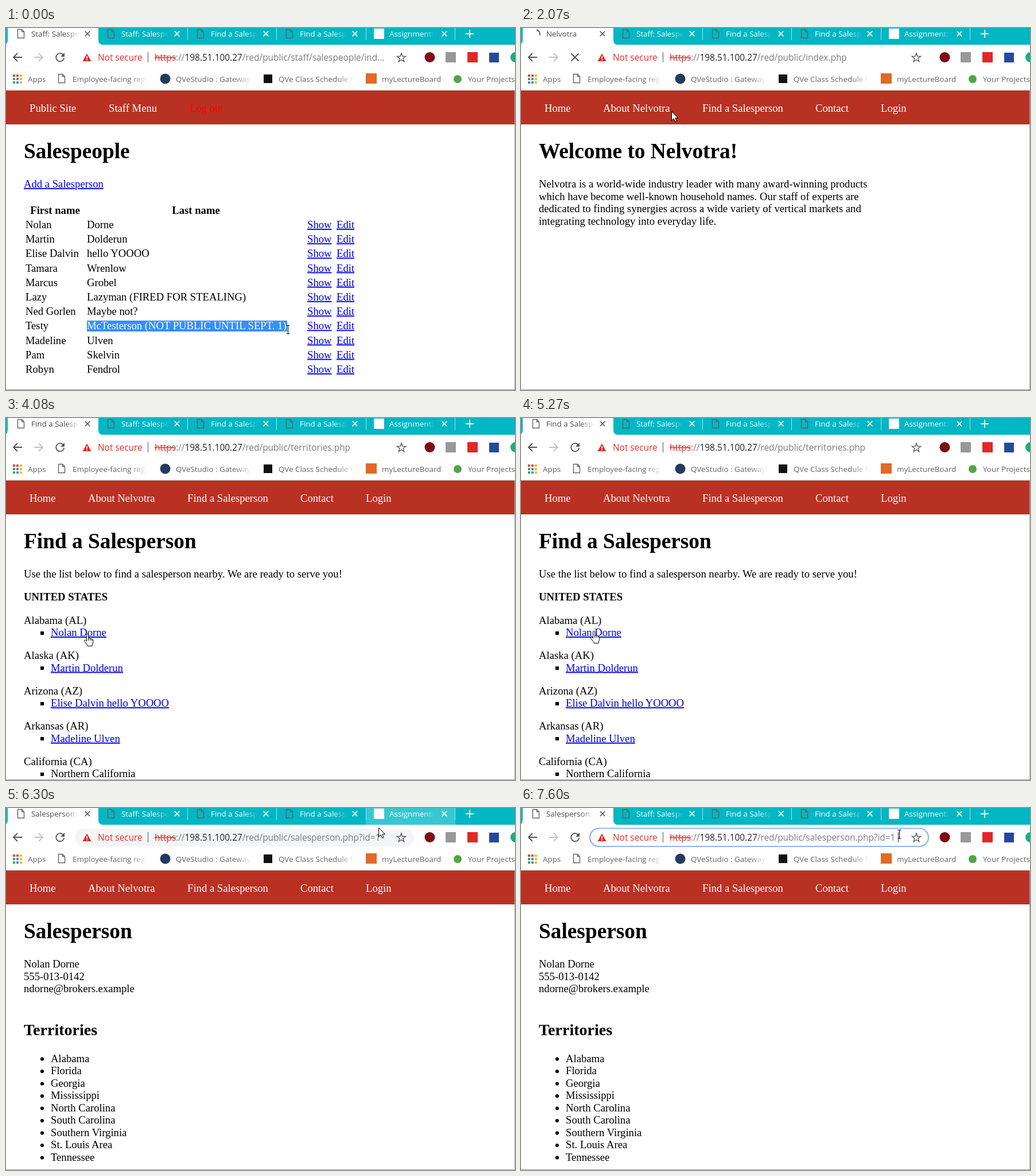
Write an HTML page that moves like this. It is 887 by 631 pixels and loops after 8 s.

```html
<!DOCTYPE html>
<html lang="en">
<head>
<meta charset="utf-8">
<title>Staff site walkthrough</title>
<style>
html, body { margin: 0; width: 100%; height: 100%; overflow: hidden; background: #fff; }
svg { display: block; width: 887px; height: 631px; }
text { white-space: pre; }
.page { font: 18.67px "Liberation Serif", "Times New Roman", serif; }
.ui { font: 13.4px "Open Sans", "Noto Sans", sans-serif; }
.url { font-size: 15.4px; fill: #777b80; }
.link { fill: #00e; text-decoration: underline; }
.b { font-weight: bold; }
.h1 { font-weight: bold; font-size: 37.33px; }
.h2 { font-weight: bold; font-size: 28px; }
.line { fill: none; stroke: #5f6368; }
</style>
</head>
<body>
<svg id="stage" viewBox="0 0 887 631" xmlns="http://www.w3.org/2000/svg"></svg>
<script>
const LOOP = 8000, TEAL = '#00b7c3', RED = '#d93025', GREY = '#5f6368', BLUE = '#3390ff';
const defs = [];

const text = (x, y, s, cls = '', attr = '') => `<text x="${x}" y="${y}" class="${cls}" ${attr}>${s}</text>`;
const rect = (x, y, w, h, fill, attr = '') => `<rect x="${x}" y="${y}" width="${w}" height="${h}" fill="${fill}" ${attr}/>`;
const dot = (x, y, r, fill) => `<circle cx="${x}" cy="${y}" r="${r}" fill="${fill}"/>`;
const line = (d, color, w = 1.5, attr = '') => `<path d="${d}" fill="none" stroke="${color}" stroke-width="${w}" ${attr}/>`;
const group = (id, body, cls = '') => `<g id="${id}" class="${cls}">${body}</g>`;
const cross = (x, y, r, color, w) => line(`M${x - r} ${y - r}l${2 * r} ${2 * r}m0 ${-2 * r}l${-2 * r} ${2 * r}`, color, w);
const sheet = (x, y) => line(`M${x + .5} ${y + .5}h7l4 4v11h-11zM${x + 7.5} ${y + .5}v4h4`, GREY, 1.4);

// Text that fades out towards its right end
function fading(x, y, s, color, end, len = 30) {
  const id = 'fade' + defs.length;
  defs.push(`<linearGradient id="${id}" gradientUnits="userSpaceOnUse" x1="${end - len}" x2="${end}" y1="0" y2="0">
    <stop offset="0" stop-color="${color}"/><stop offset="1" stop-color="${color}" stop-opacity="0"/></linearGradient>`);
  return text(x, y, s, '', `fill="url(#${id})"`);
}

// ---- browser frame ----
const titles = { staff: 'Staff: Salespe', home: 'Nelvotra', find: 'Find a Salesp', person: 'Salesperson:' };

function tabs() {
  let s = rect(0, 0, 887, 29.5, TEAL);
  s += group('tabHover', rect(627, 0, 156, 29, '#fff', 'opacity=".22"'));
  s += '<path d="M-5 30Q3 29 3 21V0H161V21Q161 29.5 170 29.5V30Z" fill="#fff"/>';
  s += group('tabIcon', sheet(20, 2));
  s += `<path id="spinner" class="line" stroke-width="2" d="M24.5 3.2A7 7 0 1 0 26 3" pathLength="100"/>`;
  for (const k in titles) s += group('title-' + k, fading(44, 15, titles[k], '#45494d', 128, 24));
  s += cross(142, 10, 4.3, '#50555a', 1.6);
  [[177, titles.staff, 298], [333, titles.find, 453], [488, titles.find, 608], [641, 'Assignment:', 764]].forEach(([x, t, close], i) => {
    s += i < 3 ? sheet(x, 2) : rect(x, 1, 18, 18, '#fff');
    s += fading(i < 3 ? x + 24 : 668, 15, t, '#fff', close - 14, 24) + cross(close, 10, 4.3, '#fff', 1.7);
  });
  for (const x of [316, 471, 627, 782]) s += rect(x, 0, 1, 21, '#a5e3e8');
  return s + line('M801 10h14M808 3v14', '#fff', 2);
}

const urls = {
  staff: '/red/public/staff/salespeople/ind...',
  home: '/red/public/index.php',
  find: '/red/public/territories.php',
  person: '/red/public/salesperson.php?id=1'
};
const HOST = '198.51.100.27';

function toolbar() {
  let s = rect(0, 29.5, 887, 79, '#fff');
  s += group('omniHover', rect(120, 36, 591, 31, '#f3f5f6', 'rx="15.5"'));
  s += group('omniFocus', rect(120, 35.5, 590, 31.5, '#fff', 'rx="15.7" stroke="#8fb4f5" stroke-width="2.2"'));
  s += line('M28 51H13M20 44l-7 7 7 7', '#50555a', 1.8);
  s += line('M49 51h15M57 44l7 7-7 7', '#bfc2c5', 1.8);
  s += group('reload', line('M100 47.2A7 7 0 1 0 101.2 52', '#50555a', 1.8) + '<path d="M102 43v7h-7z" fill="#50555a"/>');
  s += group('stop', cross(94, 51, 6.5, '#50555a', 1.8));
  s += `<path d="M141 44.5L148.5 58H133.5Z" fill="${RED}"/>` + rect(140.2, 49, 1.7, 4.5, '#fff') + rect(140.2, 54.7, 1.7, 1.7, '#fff');
  s += text(160, 57, 'Not secure', '', `font-size="15.4" fill="${RED}"`) + rect(247, 42, 1, 18, '#555');
  for (const k in urls) s += group('url-' + k, text(259, 57,
    `<tspan fill="${RED}" text-decoration="line-through">https</tspan>://<tspan fill="#202124">${HOST}</tspan>${urls[k]}`, 'url'));
  s += group('urlSelected', rect(259, 39, 387, 24, BLUE) +
    text(259, 57, `https://${HOST}${urls.person.slice(0, -1)}`, 'url', 'style="fill:#fff"'));
  s += group('caret', rect(657, 42, 1, 18, '#333'));
  let star = '';
  for (let i = 0; i < 10; i++) {
    const r = i % 2 ? 3.3 : 8, a = i * Math.PI / 5;
    star += `${i ? 'L' : 'M'}${(689 + r * Math.sin(a)).toFixed(1)} ${(52 - r * Math.cos(a)).toFixed(1)}`;
  }
  s += line(star + 'Z', GREY, 1.5);
  s += dot(738.5, 51, 9, '#7d0d17') + rect(766, 42, 18, 18, '#989898') + rect(804, 42, 18, 18, '#e12828');
  return s + rect(842, 43, 17, 17, '#27489b') + dot(888, 51, 9, '#15b377');
}

function bookmarks() {
  let s = '';
  const colors = ['#ea4335', '#ea4335', '#fbbc05', '#34a853', '#4285f4', '#fbbc05', '#34a853', '#4285f4', '#fbbc05'];
  colors.forEach((c, i) => s += rect(12 + i % 3 * 6, 81 + Math.floor(i / 3) * 6, 4, 4, c));
  s += text(38, 93.5, 'Apps', '', `fill="${GREY}"`) + sheet(91, 80);
  s += fading(116, 93.5, 'Employee-facing reg', GREY, 246) + dot(277.5, 88.5, 9, '#23395f');
  s += fading(296, 93.5, 'QVeStudio : Gateway', GREY, 428) + rect(449, 81, 15, 15, '#111');
  s += fading(475, 93.5, 'QVe Class Schedule f', GREY, 607) + rect(627, 79, 19, 18, '#e06a26');
  s += text(655, 93.5, 'myLectureBoard', '', `fill="${GREY}"`) + dot(787, 89, 7, '#4fa548');
  return s + text(805, 93.5, 'Your Projects', '', `fill="${GREY}"`);
}

// ---- pages ----
const STEP = 21.5;
const heading = s => text(31, 227, s, 'h1');
const nav = items => rect(0, 109, 887, 59, '#b93123') +
  items.map(([x, s, c = '#fff']) => text(x, 146, s, '', `fill="${c}"`)).join('');
const publicNav = nav([[41, 'Home'], [143, 'About Nelvotra'], [316, 'Find a Salesperson'], [513, 'Contact'], [627, 'Login']]);

const people = [['Nolan', 'Dorne'], ['Martin', 'Dolderun'], ['Elise Dalvin', 'hello YOOOO'], ['Tamara', 'Wrenlow'],
  ['Marcus', 'Grobel'], ['Lazy', 'Lazyman (FIRED FOR STEALING)'], ['Ned Gorlen', 'Maybe not?'],
  ['Testy', 'McTesterson (NOT PUBLIC UNTIL SEPT. 1)'], ['Madeline', 'Ulven'], ['Pam', 'Skelvin'], ['Robyn', 'Fendrol']];

function staffPage() {
  let s = nav([[41, 'Public Site'], [179, 'Staff Menu'], [320, 'Log out', '#f00']]) + heading('Salespeople');
  s += text(31, 278, 'Add a Salesperson', 'link');
  s += text(85.5, 324, 'First name', 'b', 'text-anchor="middle"') + text(331, 324, 'Last name', 'b', 'text-anchor="middle"');
  people.forEach(([first, last], i) => {
    const y = 349 + i * 25.2;
    s += text(34, y, first) + text(141, y, last) + text(525, y, 'Show', 'link') + text(576, y, 'Edit', 'link');
  });
  return s + group('rowSelected', rect(141, 510, 349, 19, BLUE) + text(141, 349 + 7 * 25.2, people[7][1], '', 'fill="#fff"'));
}

function homePage() {
  return publicNav + heading('Welcome to Nelvotra!') + [
    'Nelvotra is a world-wide industry leader with many award-winning products',
    'which have become well-known household names. Our staff of experts are',
    'dedicated to finding synergies across a wide variety of vertical markets and',
    'integrating technology into everyday life.'
  ].map((s, i) => text(31, 278 + i * STEP, s)).join('');
}

function findPage() {
  let s = publicNav + heading('Find a Salesperson');
  s += text(31, 278, 'Use the list below to find a salesperson nearby. We are ready to serve you!');
  s += text(31, 318, 'UNITED STATES', 'b');
  [['Alabama (AL)', people[0]], ['Alaska (AK)', people[1]], ['Arizona (AZ)', people[2]],
    ['Arkansas (AR)', people[8]], ['California (CA)', ['Northern', 'California']]].forEach(([state, name], i) => {
    const y = 358.5 + i * 61.6;
    s += text(31, y, state) + rect(60, Math.round(y + 13), 6, 6, '#000');
    s += text(78, y + STEP, name.join(' '), i < 4 ? 'link' : '');
  });
  return s;
}

function personPage() {
  let s = publicNav + heading('Salesperson');
  [people[0].join(' '), '555-013-0142', 'ndorne@brokers.example'].forEach((t, i) => s += text(31, 278 + i * STEP, t));
  s += text(31, 396, 'Territories', 'h2');
  ['Alabama', 'Florida', 'Georgia', 'Mississippi', 'North Carolina', 'South Carolina', 'Southern Virginia',
    'St. Louis Area', 'Tennessee'].forEach((t, i) => {
    s += dot(63, 437.5 + i * STEP, 3.1, '#000') + text(78, 442.5 + i * STEP, t);
  });
  return s;
}

// ---- pointers ----
const outline = 'fill="#fff" stroke="#000" stroke-linejoin="round"';
const pointers = {
  arrow: `<path d="M.5 .5V16.3L4.2 12.8L6.7 18.4L9.2 17.3L6.8 11.8H11.8Z" ${outline}/>`,
  hand: `<path d="M5.5 13V2.2a1.6 1.6 0 0 1 3.2 0V8.5q0-1 1.5-.8t1.5 1.3q.2-.9 1.5-.6t1.4 1.3q.3-.7 1.2-.3t.9 1.4V15q0 2-1.5 4V21.5H7V20L2 13.5Q.6 11.5 2 11T5.5 13Z" ${outline}/>`
    + line('M8.7 8.5v3.5M11.7 9v3M14.6 9.7v2.6', '#000', 1),
  beam: line('M.5 .5h2.5l.5 .5l.5-.5h2.5M3.5 1v13.5M.5 15h2.5l.5-.5l.5 .5h2.5', '#000', 1.1)
};

// ---- assembly ----
const pages = { staff: staffPage(), home: homePage(), find: findPage(), person: personPage() };
const frame = tabs() + toolbar() + bookmarks();
const stage = document.getElementById('stage');
stage.innerHTML = `<defs>${defs.join('')}</defs>` + group('frame', frame, 'ui') + rect(0, 108, 887, 1, '#cfd3d6') +
  Object.keys(pages).map(k => group('page-' + k, pages[k], 'page')).join('') +
  rect(886, 109, 1, 522, '#a9a9a9') + rect(0, 630, 887, 1, '#9a9a9a') +
  group('pointer', Object.keys(pointers).map(k => group(k, pointers[k])).join(''));

// ---- timeline: [start ms, value] ----
const pageSteps = [[0, 'staff'], [2070, 'home'], [3140, 'find'], [5660, 'person']];
const urlSteps = [[0, 'staff'], [1920, 'home'], [2990, 'find'], [5540, 'person']];
const loads = [[1490, 2310], [2990, 3400], [5420, 5780]];
const moves = [
  [0, 'beam', 488, 518], [120, 'arrow', 474, 505], [250, 'arrow', 459, 485], [820, 'arrow', 279, 306],
  [970, 'arrow', 160, 205], [1090, 'hand', 73, 135], [1210, 'hand', 87, 136], [1490, 'hand', 75, 134],
  [1640, 'hand', 130, 136], [1770, 'arrow', 196, 141], [1920, 'arrow', 215, 144], [2070, 'arrow', 262, 145],
  [2190, 'arrow', 300, 144], [2310, 'arrow', 325, 143], [2860, 'arrow', 342, 142], [2990, 'hand', 337, 141],
  [3140, 'hand', 337, 141], [3280, 'arrow', 343, 180], [3400, 'arrow', 344, 227], [3550, 'arrow', 255, 300],
  [3670, 'arrow', 162, 358], [3820, 'hand', 148, 370], [3940, 'hand', 135, 373], [4080, 'hand', 135, 376],
  [4330, 'hand', 136, 375], [4450, 'hand', 137, 374], [4720, 'hand', 136, 374], [4840, 'hand', 135, 372],
  [4990, 'hand', 125, 371], [5270, 'hand', 120, 371], [5660, 'arrow', 190, 345], [5780, 'arrow', 400, 230],
  [5910, 'arrow', 610, 94], [6060, 'arrow', 655, 48], [6180, 'arrow', 668, 18], [6300, 'arrow', 649, 34],
  [6450, 'beam', 650, 42], [6570, 'beam', 648, 40], [6820, 'beam', 646, 40], [7080, 'beam', 450, 43],
  [7200, 'beam', 262, 43], [7600, 'beam', 656, 38]
];

const $ = id => document.getElementById(id);
const at = (steps, t) => steps.findLast(s => s[0] <= t);
const show = (id, on) => $(id).style.display = on ? '' : 'none';
const between = (t, a, b) => t >= a && t < b;

function draw(t) {
  const page = at(pageSteps, t)[1], url = at(urlSteps, t)[1];
  for (const k in pages) {
    show('page-' + k, k === page);
    show('title-' + k, k === page);
    show('url-' + k, k === url);
  }
  const load = loads.find(([a, b]) => between(t, a, b));
  show('reload', !load);
  show('stop', load);
  show('tabIcon', !load);
  show('spinner', load);
  if (load) {
    const age = t - load[0];
    $('spinner').setAttribute('stroke-dasharray', `${age < 150 ? 3 : Math.min(30, age / 15)} 200`);
    $('spinner').setAttribute('transform', `rotate(${age < 150 ? 0 : -age * .4} 26 10)`);
  }
  show('rowSelected', t < 540);
  show('tabHover', between(t, 6180, 6450));
  show('omniHover', between(t, 6060, 6820));
  show('omniFocus', t >= 6820);
  show('urlSelected', between(t, 7080, 7600));
  show('caret', t >= 7600);
  const [, kind, x, y] = at(moves, t);
  for (const k in pointers) show(k, k === kind);
  $('pointer').setAttribute('transform', `translate(${x} ${y})`);
}

const start = performance.now();
function tick(now) {
  draw(Math.max(0, now - start) % LOOP);
  requestAnimationFrame(tick);
}
draw(0);
requestAnimationFrame(tick);
</script>
</body>
</html>
```
